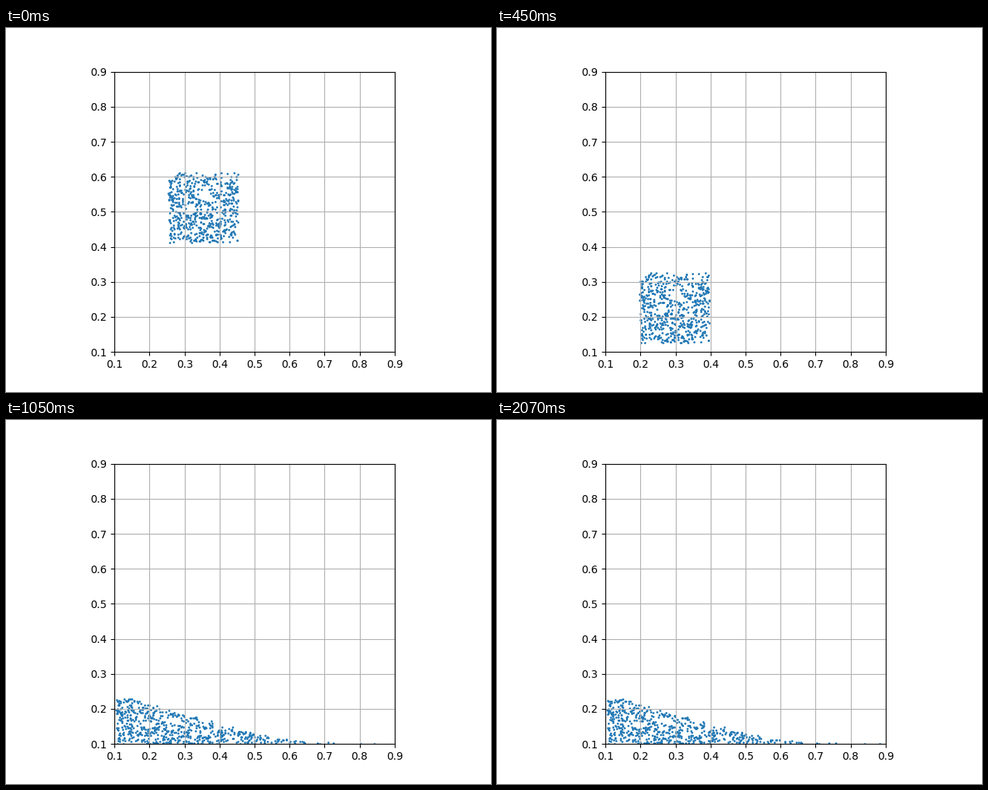
These frames come from a looping animation (640 px wide and 480 px high, 2.1 s). A matplotlib script:

```python
import numpy as np
import matplotlib.pyplot as plt
from matplotlib.animation import FuncAnimation

FRAMES, INTERVAL = 70, 30
COUNT = 600
SIDE, FLOOR, WALL = 0.2, 0.1, 0.104
IMPACT = 15

rng = np.random.default_rng(11)
u, v = rng.random((2, COUNT))


def fall(k):
    """Rigid block in free fall with a slight leftward drift."""
    x = 0.2535 - 0.00377 * k + SIDE * u
    y = 0.412 - 0.0074 * k - 0.00078 * k**2 + SIDE * v
    return np.array([x, y])


def dome(center, half, height, power):
    """Surface height: boxy for a large power, a parabola for power 2."""
    return lambda x: height * (1 - np.abs((x - center) / half) ** power)


def ramp(foot, slope, crest=1.0, blend=0.05):
    """Surface height: a slope that fades into a thin film past its foot."""
    return lambda x: np.minimum(
        crest, slope * blend * np.logaddexp(0, (foot - x) / blend) + 0.002)


def heap(left, right, surface, hollow=0.0):
    """Spread the grains evenly under a surface and above an optional hollow."""
    x = np.linspace(left, right, 800)
    base = hollow * np.maximum(0, 1 - ((x - 0.29) / 0.09) ** 2)
    depth = np.maximum(surface(x) - base, 1e-3)
    area = np.cumsum(depth) - depth[0]
    gx = np.interp(u, area / area[-1], x)
    gy = FLOOR + np.interp(gx, x, base) + v * np.interp(gx, x, depth)
    return np.array([gx, gy])


rest = heap(WALL, 0.905, ramp(0.6, 0.28))
toe = (rest[0] > 0.6) & (rest[0] < 0.8)

poses = {
    IMPACT: fall(IMPACT),
    16: heap(0.19, 0.398, dome(0.294, 0.106, 0.196, 30)),
    18: heap(0.121, 0.465, dome(0.293, 0.174, 0.177, 4), 0.015),
    20: heap(WALL, 0.53, dome(0.28, 0.25, 0.152, 2), 0.055),
    24: heap(WALL, 0.65, ramp(0.54, 0.5, crest=0.125)),
    28: heap(WALL, 0.76, ramp(0.6, 0.285)),
    38: rest,
    FRAMES - 1: rest + np.outer([0.005, 0], toe),
}
times = sorted(poses)


def grains(k):
    if k <= IMPACT:
        return fall(k)
    i = np.searchsorted(times, k)
    a, b = times[i - 1], times[i]
    t = (k - a) / (b - a)
    return (1 - t) * poses[a] + t * poses[b]


fig, ax = plt.subplots(figsize=(6.4, 4.8), dpi=100)
ax.set_aspect("equal")
ax.set(xlim=(0.1, 0.9), ylim=(0.1, 0.9))
ax.grid(True)
dots = ax.scatter(*grains(0), s=1)


def update(k):
    dots.set_offsets(grains(k).T)
    return (dots,)


anim = FuncAnimation(fig, update, frames=FRAMES, interval=INTERVAL,
                     repeat=True, repeat_delay=0)
plt.show()
```
